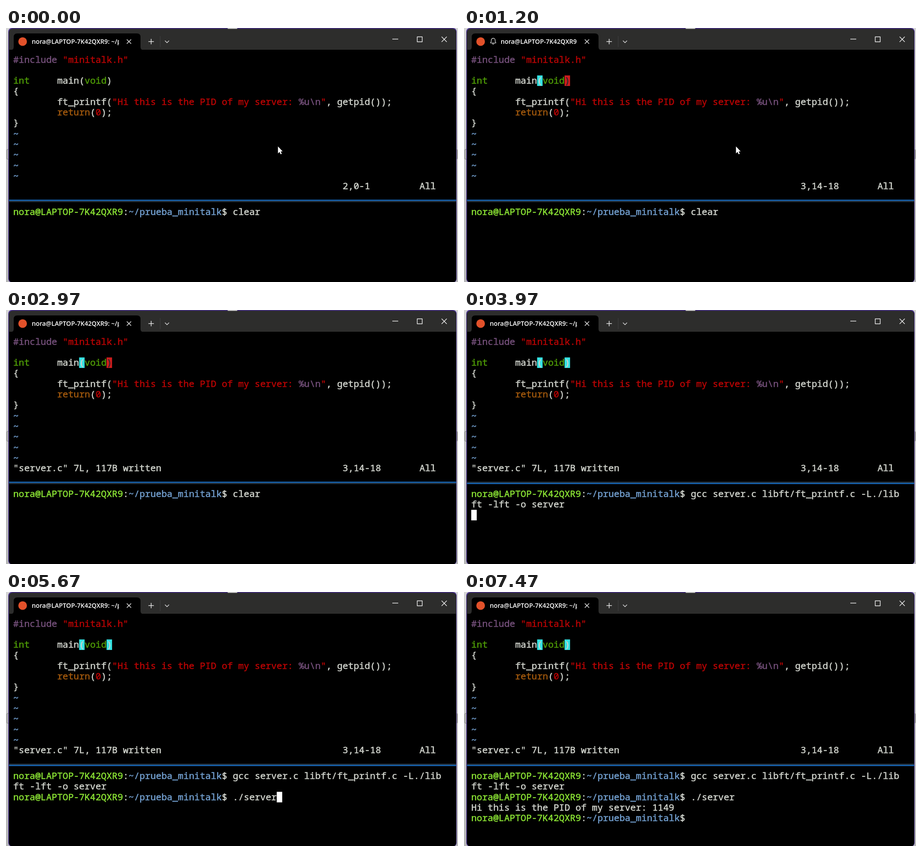
Recreate the animation shown at these times as an HTML page with a canvas. Size 998 by 561 pixels, loop 7.51 s.

```html
<!DOCTYPE html>
<html lang="en">
<head>
<meta charset="utf-8">
<title>Terminal</title>
<style>
html, body { margin: 0; width: 100%; height: 100%; overflow: hidden; background: #000; }
canvas { display: block; width: 998px; height: 561px; }
</style>
</head>
<body>
<canvas id="stage" width="998" height="561"></canvas>
<script>
const ctx = document.getElementById('stage').getContext('2d');
const LOOP = 7510, BLINK = 530;
const LEFT = 16, CELL = 12.12, ROW = 23.27, TOP = 58.2, LOWER = 394.8;

const WHITE = '#d0d3cc', RED = '#b80404', GREEN = '#4e9a06', PURPLE = '#75507b';
const BROWN = '#a2590d', BLUE = '#729fcf', LIME = '#8ae234', CYAN = '#34e2e2';

const HOST = 'nora@LAPTOP-7K42QXR9';
const PATH = '~/prueba_minitalk';
const GCC = ['gcc server.c libft/ft_printf.c -L./lib', 'ft -lft -o server'];

// moments in ms
const T = {
  jump: 400, bell: 860, colon: 1400, w: 1700, write: 2480, bellEnd: 2860,
  focus: 3250, recall: 3600, compile: 3950, prompt: 4450,
  again: 4750, server: 5400, run: 5860, output: 5900
};
const KEYS = [-600, T.jump, T.bell, T.colon, T.w, T.write, T.focus,
  T.recall, T.compile, T.again, T.server, T.run];

function rect(x, y, w, h, color) {
  ctx.fillStyle = color;
  ctx.fillRect(x, y, w, h);
}

function round(x, y, w, h, r, color) {
  ctx.fillStyle = color;
  ctx.beginPath();
  ctx.roundRect(x, y, w, h, r);
  ctx.fill();
}

function line(points, color, width) {
  ctx.strokeStyle = color;
  ctx.lineWidth = width;
  ctx.beginPath();
  points.forEach(([x, y], i) => i ? ctx.lineTo(x, y) : ctx.moveTo(x, y));
  ctx.stroke();
}

function cross(x, y, r, width) {
  line([[x - r, y - r], [x + r, y + r]], '#eee', width);
  line([[x + r, y - r], [x - r, y + r]], '#eee', width);
}

// runs: text, color, text, color ...
function write(top, row, col, ...runs) {
  ctx.font = '20.2px "Noto Sans Mono", "DejaVu Sans Mono", monospace';
  ctx.lineWidth = 0.55;
  ctx.lineJoin = 'round';
  for (let i = 0; i < runs.length; i += 2) {
    const x = LEFT + col * CELL, y = top + row * ROW + 18.4;
    ctx.fillStyle = ctx.strokeStyle = runs[i + 1];
    ctx.fillText(runs[i], x, y);
    ctx.strokeText(runs[i], x, y);
    col += runs[i].length;
  }
}

function block(top, row, col, color) {
  rect(LEFT + col * CELL, top + row * ROW, CELL, ROW, color);
}

function blinkOn(t) {
  const last = KEYS.filter(k => k <= t).pop();
  return Math.floor((t - last) / BLINK) % 2 === 0;
}

function drawBell(x, y) {
  ctx.strokeStyle = '#eee';
  ctx.lineWidth = 1.2;
  ctx.beginPath();
  ctx.moveTo(x - 6, y + 3.5);
  ctx.lineTo(x - 4.3, y);
  ctx.lineTo(x - 4.3, y - 2.5);
  ctx.arc(x, y - 2.5, 4.3, Math.PI, 0);
  ctx.lineTo(x + 4.3, y);
  ctx.lineTo(x + 6, y + 3.5);
  ctx.closePath();
  ctx.stroke();
  ctx.beginPath();
  ctx.arc(x, y + 4, 2.2, 0.2, Math.PI - 0.2);
  ctx.stroke();
}

function drawWindow() {
  const desk = ctx.createLinearGradient(0, 0, 0, 561);
  desk.addColorStop(0, '#d6d6d6');
  desk.addColorStop(1, '#b6b6b8');
  rect(0, 0, 998, 561, desk);
  round(1.5, 267.5, 10, 23, 3, '#777');
  round(2.5, 268.5, 10, 21, 2, '#bcbcba');
  round(986, 268, 12, 22, 3, '#999');
  round(5, 0, 990, 562, 8, '#4c3590');
  round(6.5, 1.8, 987.5, 560, 8, '#000');
  round(6.5, 1.8, 987.5, 46.2, [8, 8, 0, 0], '#2d2d2c');
  round(489, -4, 22, 6, 2, '#c8c8c8');
}

function drawTitle(t) {
  ctx.fillStyle = '#000';
  ctx.beginPath();
  ctx.moveTo(11, 48.5);
  ctx.quadraticCurveTo(17, 48, 17, 42);
  ctx.lineTo(17, 20);
  ctx.quadraticCurveTo(17, 12, 25, 12);
  ctx.lineTo(289, 12);
  ctx.quadraticCurveTo(297, 12, 297, 20);
  ctx.lineTo(297, 42);
  ctx.quadraticCurveTo(297, 48, 303, 48.5);
  ctx.fill();

  ctx.fillStyle = '#e2512a';
  ctx.beginPath();
  ctx.arc(36.7, 30, 9.5, 0, 7);
  ctx.fill();

  const ringing = t >= T.bell && t < T.bellEnd;
  if (ringing) drawBell(64.5, 29.5);
  ctx.save();
  ctx.beginPath();
  ctx.rect(50, 14, 199.5, 32);
  ctx.clip();
  ctx.font = '600 13.8px "Open Sans", "Noto Sans", sans-serif';
  ctx.fillStyle = '#fff';
  ctx.fillText(HOST + ': ' + PATH, ringing ? 81 : 57, 35);
  ctx.restore();

  cross(271.5, 30, 4.8, 1.3);
  line([[314.5, 30], [326.5, 30]], '#eee', 1.4);
  line([[320.5, 24], [320.5, 36]], '#eee', 1.4);
  line([[340.5, 18], [340.5, 42]], '#404040', 1);
  line([[351, 28], [355.5, 32.5], [360, 28]], '#ddd', 1.4);
  line([[853, 24.5], [866, 24.5]], '#eee', 1.4);
  ctx.strokeRect(908, 19.5, 11, 11);
  cross(967.5, 25, 5.7, 1.4);
}

function drawEditor(t, on) {
  write(TOP, 0, 0, '#include ', PURPLE, '"minitalk.h"', RED);
  write(TOP, 2, 0, 'int', GREEN);

  const cmdline = t >= T.colon && t < T.write;
  let close = WHITE;
  if (t >= T.jump) {
    const cursor = on && !cmdline && t < T.focus;
    block(TOP, 2, 12, CYAN);
    block(TOP, 2, 17, cursor ? '#cb1d1d' : CYAN);
    if (cursor) close = '#2c2830';
  } else if (on) {
    block(TOP, 1, 0, '#fff');
  }
  write(TOP, 2, 8, 'main(', WHITE, 'void', GREEN, ')', close);

  write(TOP, 3, 0, '{', WHITE);
  write(TOP, 4, 8, 'ft_printf(', WHITE, '"Hi this is the PID of my server: ', RED,
    '%u\\n', PURPLE, '"', RED, ', getpid());', WHITE);
  write(TOP, 5, 8, 'return', BROWN, '(', WHITE, '0', RED, ');', WHITE);
  write(TOP, 6, 0, '}', WHITE);
  for (let row = 7; row < 12; row++) write(TOP + 1.3, row, 0, '~', BLUE);

  if (cmdline) {
    const cmd = t < T.w ? ':' : ':w';
    write(TOP, 12, 0, cmd, WHITE);
    if (on) block(TOP, 12, cmd.length, '#fff');
    return;
  }
  if (t >= T.write) write(TOP, 12, 0, '"server.c" 7L, 117B written', WHITE);
  write(TOP, 12, 60, t < T.jump ? '2,0-1' : '3,14-18', WHITE);
  write(TOP, 12, 74, 'All', WHITE);
}

function drawDivider(t) {
  const lower = t >= T.focus;
  rect(6.5, 379.2, 987.5, 2.6, lower ? '#26323c' : '#176abd');
  rect(6.5, 381.8, 987.5, 2.6, lower ? '#176abd' : '#26323c');
}

function drawShell(t, on) {
  let row = 0, col = 0;
  const print = (text, color = WHITE) => {
    write(LOWER, row, col, text, color);
    col += text.length;
  };
  const newline = () => { row++; col = 0; };
  const prompt = () => {
    print(HOST, LIME);
    print(':');
    print(PATH, BLUE);
    print('$ ');
  };
  const gcc = () => { print(GCC[0]); newline(); print(GCC[1]); };

  prompt();
  if (t < T.recall) print('clear');
  else gcc();
  if (t >= T.compile) newline();
  if (t >= T.prompt) prompt();
  if (t >= T.server) print('./server');
  else if (t >= T.again) gcc();
  if (t >= T.run) newline();
  if (t >= T.output) {
    print('Hi this is the PID of my server: 1149');
    newline();
    prompt();
  }
  if (on && t >= T.focus) block(LOWER, row, col, '#fff');
}

function drawPointer(x, y) {
  const shape = [[0, 0], [0, 15.5], [3.6, 12.2], [6, 17.4], [8.4, 16.3], [6, 11.3], [10.3, 11]];
  ctx.beginPath();
  shape.forEach(([dx, dy]) => ctx.lineTo(x + dx, y + dy));
  ctx.closePath();
  ctx.fillStyle = '#fff';
  ctx.fill();
}

function draw(now) {
  const t = now % LOOP, on = blinkOn(t);
  drawWindow();
  drawTitle(t);
  drawEditor(t, on);
  drawDivider(t);
  drawShell(t, on);
  if (t < T.colon) drawPointer(600.5, 261.5);
}

let start;
function tick(now) {
  start ??= now;
  draw(now - start);
  requestAnimationFrame(tick);
}
draw(0);
requestAnimationFrame(tick);
</script>
</body>
</html>
```
